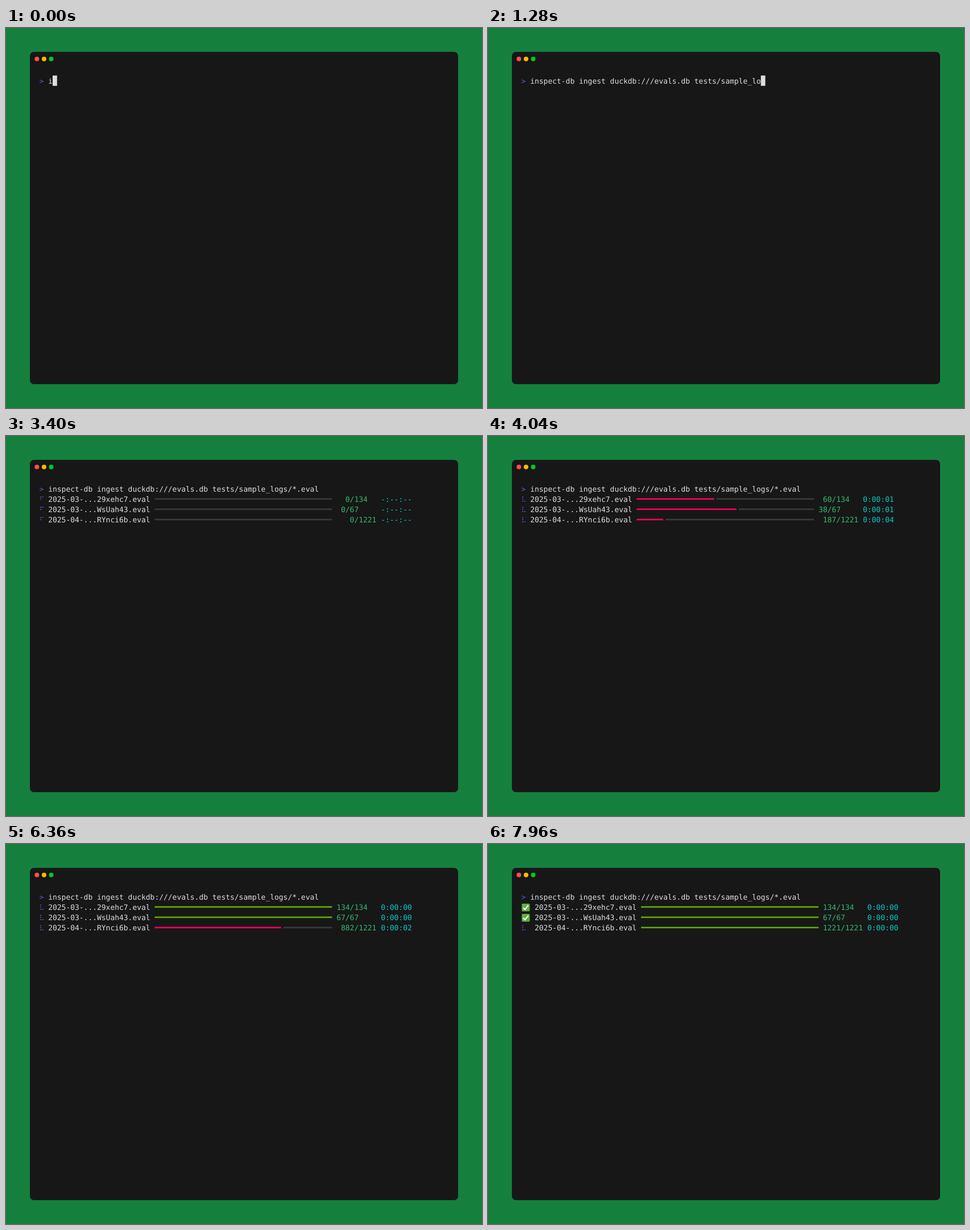
An HTML page for the animation above (8000 ms loop, 837x669 px).

```html
<!DOCTYPE html>
<html lang="en">
<head>
<meta charset="utf-8">
<title>Terminal ingest</title>
<style>
  html, body { margin: 0; width: 100%; height: 100%; overflow: hidden; background: #15803d; }
  svg { display: block; width: 100vw; height: 100vh; }
  text {
    font: 13px "DejaVu Sans Mono", "Noto Sans Mono", monospace;
    letter-spacing: -0.026px;
    white-space: pre;
    text-rendering: geometricPrecision;
    fill: #ddd;
  }
</style>
</head>
<body>
<svg id="stage" viewBox="0 0 837 669"></svg>
<script>
const LOOP = 8000, FRAME = 40;
const X0 = 58.6, Y0 = 83.7, CW = 7.8, CH = 18.1;
const BAR_CELLS = 40, START = 3320;
const COMMAND = "inspect-db ingest duckdb:///evals.db tests/sample_logs/*.eval";
const TYPING = [[0, 1], [720, 29], [840, 35], [1520, 61]];
const SPINNER = [..."⠋⠙⠹⠸⠼⠴⠦⠧⠇⠏"];

// Refresh bursts: first time, last time, number of refreshes, index of the first.
const BURSTS = [
  [3320, 4040, 8, 0], [4240, 4960, 8, 9], [5080, 5360, 4, 17], [5560, 6360, 9, 22],
  [6480, 6880, 5, 31], [7080, 7880, 9, 37], [7960, 7960, 1, 46]
];

const TASKS = [
  { name: "2025-03-...29xehc7.eval", total: 134, checkAt: 7960,
    keys: [[START, 0], [4040, 60], [4960, 134]] },
  { name: "2025-03-...WsUah43.eval", total: 67, checkAt: 7880,
    keys: [[START, 0], [4040, 38], [4600, 67]] },
  { name: "2025-04-...RYnci6b.eval", total: 1221, checkAt: Infinity,
    keys: [[START, 0], [4040, 187], [4960, 350], [5160, 421], [6360, 882], [7240, 1221]] }
];

const stage = document.getElementById("stage");
const colX = col => X0 + col * CW;
const rowY = row => Y0 + row * CH;

function add(parent, tag, attrs, content = "") {
  const el = document.createElementNS("http://www.w3.org/2000/svg", tag);
  set(el, attrs);
  el.textContent = content;
  parent.appendChild(el);
  return el;
}

function set(el, attrs) {
  for (const key in attrs) el.setAttribute(key, attrs[key]);
}

function label(parent, col, row, content, color) {
  const el = add(parent, "text", { x: colX(col), y: rowY(row) + 14.1 }, content);
  if (color) el.style.fill = color;
  return el;
}

function show(el, on) {
  el.style.display = on ? "" : "none";
}

function lerpKeys(keys, t) {
  if (t <= keys[0][0]) return keys[0][1];
  for (let i = 1; i < keys.length; i++) {
    const [t0, v0] = keys[i - 1], [t1, v1] = keys[i];
    if (t <= t1) return v0 + (v1 - v0) * (t - t0) / (t1 - t0);
  }
  return keys[keys.length - 1][1];
}

// Latest refresh at or before t.
function lastRefresh(t) {
  let found = null;
  for (const [from, to, count, first] of BURSTS) {
    for (let i = 0; i < count; i++) {
      const raw = count > 1 ? from + (to - from) * i / (count - 1) : from;
      const time = Math.round(raw / FRAME) * FRAME;
      if (time <= t) found = { time, index: first + i };
    }
  }
  return found;
}

function timeLeft(done, total, elapsed) {
  if (done >= total) return "0:00:00";
  if (!done) return "-:--:--";
  const seconds = Math.ceil((total - done) * elapsed / done / 1000);
  return "0:00:" + String(seconds).padStart(2, "0");
}

function buildTask(task, i) {
  const row = i + 1, y = rowY(row);
  const root = add(stage, "g", {});
  const dots = [];
  for (let n = 0; n < 6; n++) {
    dots.push(add(root, "circle", {
      cx: n < 3 ? 61.2 : 64.7, cy: y + 5.6 + (n % 3) * 3.7, r: 0.9, fill: "#7a62ff"
    }));
  }
  const check = add(root, "g", { transform: `translate(59 ${y + 2.8})` });
  add(check, "rect", { x: 0.4, y: 0.4, width: 14, height: 13.6, rx: 1.6, fill: "#5fae45" });
  add(check, "path", {
    d: "M3 7.6 L6 10.8 L11.8 3.4", fill: "none", stroke: "#fff", "stroke-width": 2.1
  });
  const body = add(root, "g", {});
  label(body, 2, row, task.name);
  const line = { y: y + 7.75, height: 2.6 };
  const back = add(body, "rect", { ...line, fill: "#3a3a3a" });
  const fill = add(body, "rect", { ...line, x: colX(26) });
  const count = label(body, 67, row, "", "#31bb71");
  const left = label(body, 77, row, "", "#04c9c9");
  return { root, dots, check, body, back, fill, count, left };
}

function drawTask(task, ui, refresh, shift) {
  const { time, index } = refresh;
  const { total } = task;
  const done = Math.floor(lerpKeys(task.keys, time) + 1e-6);
  const halves = Math.floor(BAR_CELLS * 2 * done / total);
  const checked = time >= task.checkAt;

  const step = Math.max(0, Math.floor(1.264 * index - 0.898)) % SPINNER.length;
  const bits = SPINNER[step].charCodeAt(0) - 0x2800;
  ui.dots.forEach((dot, n) => show(dot, !checked && bits >> n & 1));
  show(ui.check, checked);

  const backFrom = halves ? Math.min(halves + 1, BAR_CELLS * 2) : 0;
  set(ui.fill, {
    width: halves * CW / 2,
    fill: done >= total ? "#5faf00" : "#ff005f"
  });
  set(ui.back, {
    x: colX(26 + backFrom / 2),
    width: (BAR_CELLS - backFrom / 2) * CW
  });
  ui.count.textContent = String(done).padStart(String(total).length) + "/" + total;
  ui.left.textContent = timeLeft(done, total, time - START);
  set(ui.body, { transform: `translate(${shift ? CW : 0} 0)` });
}

add(stage, "rect", { width: 837, height: 669, fill: "#15803d" });
add(stage, "rect", { x: 42, y: 42, width: 753, height: 585, rx: 7, fill: "#171717" });
["#ff4f4d", "#febb00", "#00cc1d"].forEach((fill, i) =>
  add(stage, "circle", { cx: 54.3 + i * 12.6, cy: 54.5, r: 4, fill }));
label(stage, 0, 0, ">", "#5a56e0");
const command = label(stage, 2, 0, "");
const cursor = add(stage, "rect", { width: CW, height: CH, fill: "#ddd" });
const rows = TASKS.map(buildTask);

function render(now) {
  const t = Math.floor((now % LOOP) / FRAME) * FRAME;
  const typed = Math.round(lerpKeys(TYPING, t));
  command.textContent = COMMAND.slice(0, typed);

  const entered = t >= 1800;
  set(cursor, { x: colX(entered ? 0 : 2 + typed), y: rowY(entered ? 1 : 0) });
  show(cursor, t < 2400 || (t >= 2960 && t < START));

  const refresh = lastRefresh(t);
  const shift = refresh && TASKS.some(task => refresh.time >= task.checkAt);
  rows.forEach((ui, i) => {
    show(ui.root, refresh);
    if (refresh) drawTask(TASKS[i], ui, refresh, shift);
  });
}

const begin = performance.now();
function tick() {
  render(performance.now() - begin);
  requestAnimationFrame(tick);
}
tick();
</script>
</body>
</html>
```
